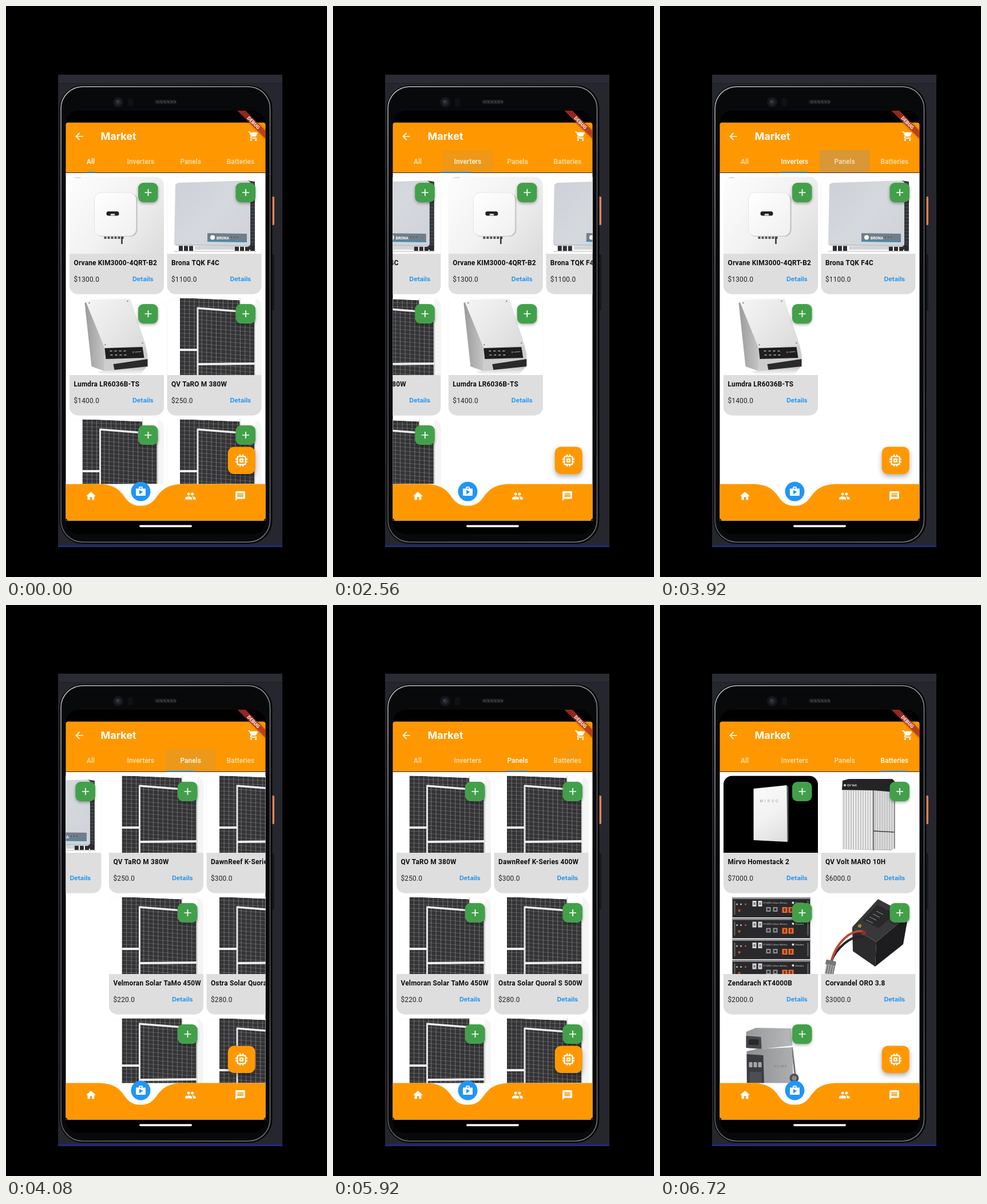
Recreate the animation shown at these times as an HTML page with a canvas. Size 561 by 998 pixels, loop 8.24 s.

```html
<!DOCTYPE html>
<html lang="en">
<head>
<meta charset="utf-8">
<title>Market</title>
<style>
  html, body { margin: 0; width: 100%; height: 100%; overflow: hidden; background: #000; }
  canvas { display: block; }
</style>
</head>
<body>
<canvas id="stage" width="561" height="998"></canvas>
<script>
const ctx = document.getElementById('stage').getContext('2d');
const LOOP = 8240, STEP = 80, SLIDE = 300;
const ORANGE = '#ff9800', BLUE = '#2196f3', GREEN = '#43a04a';
const LEFT = 104.5, RIGHT = 453.5, WIDTH = RIGHT - LEFT, TAB = WIDTH / 4;

const icons = {
  back: 'M20 11H7.83l5.59-5.59L12 4l-8 8 8 8 1.41-1.41L7.83 13H20v-2z',
  cart: 'M7 18c-1.1 0-2 .9-2 2s.9 2 2 2 2-.9 2-2-.9-2-2-2zM1 2v2h2l3.6 7.59-1.35 2.45c-.16.28-.25.61-.25.96 0 1.1.9 2 2 2h12v-2H7.42c-.14 0-.25-.11-.25-.25l.03-.12.9-1.63h7.45c.75 0 1.41-.41 1.75-1.03l3.58-6.49c.08-.14.12-.31.12-.48 0-.55-.45-1-1-1H5.21l-.94-2H1zm16 16c-1.1 0-2 .9-2 2s.9 2 2 2 2-.9 2-2-.9-2-2-2z',
  home: 'M10 20v-6h4v6h5v-8h3L12 3 2 12h3v8z',
  shop: 'M16 6V4c0-1.1-.9-2-2-2h-4c-1.1 0-2 .9-2 2v2H2v13c0 1.1.9 2 2 2h16c1.1 0 2-.9 2-2V6zM10 4h4v2h-4zM9 18V9l7.5 4z',
  people: 'M16 11c1.66 0 3-1.34 3-3s-1.34-3-3-3-3 1.34-3 3 1.34 3 3 3zm-8 0c1.66 0 3-1.34 3-3S9.66 5 8 5 5 6.34 5 8s1.34 3 3 3zm0 2c-2.33 0-7 1.17-7 3.5V19h14v-2.5c0-2.33-4.67-3.5-7-3.5zm8 0c-.29 0-.62.02-.97.05 1.16.84 1.97 1.97 1.97 3.45V19h6v-2.5c0-2.33-4.67-3.5-7-3.5z',
  chat: 'M20 2H4c-1.1 0-2 .9-2 2v18l4-4h14c1.1 0 2-.9 2-2V4c0-1.1-.9-2-2-2zm-2 12H6v-2h12zm0-3H6V9h12zm0-3H6V6h12z',
  chip: 'M15 9H9v6h6zm-2 4h-2v-2h2zm8-2V9h-2V7c0-1.1-.9-2-2-2h-2V3h-2v2h-2V3H9v2H7c-1.1 0-2 .9-2 2v2H3v2h2v2H3v2h2v2c0 1.1.9 2 2 2h2v2h2v-2h2v2h2v-2h2c1.1 0 2-.9 2-2v-2h2v-2h-2v-2zm-4 6H7V7h10z'
};

// ---------- drawing helpers ----------
function scoped(draw) { ctx.save(); draw(); ctx.restore(); }

function rect(x, y, w, h, fill) { ctx.fillStyle = fill; ctx.fillRect(x, y, w, h); }

function round(x, y, w, h, r, fill, stroke, width = 1) {
  ctx.beginPath();
  ctx.roundRect(x, y, w, h, r);
  if (fill) { ctx.fillStyle = fill; ctx.fill(); }
  if (stroke) { ctx.strokeStyle = stroke; ctx.lineWidth = width; ctx.stroke(); }
}

function circle(x, y, r, fill) {
  ctx.beginPath();
  ctx.arc(x, y, r, 0, 7);
  ctx.fillStyle = fill;
  ctx.fill();
}

function poly(fill, ...points) {
  ctx.beginPath();
  points.forEach(([x, y]) => ctx.lineTo(x, y));
  ctx.closePath();
  ctx.fillStyle = fill;
  ctx.fill();
}

function line(color, width, x1, y1, x2, y2) {
  ctx.strokeStyle = color;
  ctx.lineWidth = width;
  ctx.beginPath();
  ctx.moveTo(x1, y1);
  ctx.lineTo(x2, y2);
  ctx.stroke();
}

function text(str, x, y, font, fill, spacing = 0, align = 'left') {
  ctx.font = font;
  ctx.letterSpacing = spacing + 'px';
  ctx.textAlign = align;
  ctx.fillStyle = fill;
  ctx.fillText(str, x, y);
}

function blend(x1, y1, x2, y2, ...colors) {
  const g = ctx.createLinearGradient(x1, y1, x2, y2);
  colors.forEach((c, i) => g.addColorStop(i / (colors.length - 1), c));
  return g;
}

function icon(name, cx, cy, size = 20.3) {
  scoped(() => {
    ctx.translate(cx - size / 2, cy - size / 2);
    ctx.scale(size / 24, size / 24);
    ctx.fillStyle = '#fff';
    ctx.fill(new Path2D(icons[name]), 'evenodd');
  });
}

function shadow(blur, dy, alpha) {
  ctx.shadowColor = `rgba(0,0,0,${alpha})`;
  ctx.shadowBlur = blur;
  ctx.shadowOffsetY = dy;
}

// ---------- product pictures, each in a 164 x 134 box ----------
function roundInverter() {
  rect(-1, -1, 166, 135, blend(0, 0, 164, 134, '#fdfdfd', '#f2f2f2', '#dcdcdc'));
  rect(7, 0, 12, 2, '#ddd');
  for (let x = 60; x < 94; x += 6) rect(x, 103, 4, 5, '#555');
  line('#333', 2.5, 91, 104, 91, 117);
  round(44, 28, 74, 76, 12, '#bdbdbd');
  round(43, 27, 73, 76, 12, blend(43, 27, 116, 103, '#fff', '#f0f0f0'), '#dcdcdc', .7);
  round(64, 60, 22, 7.5, 3.5, '#222');
  round(71, 64, 8, 3.5, 2, '#ccc');
}

function wideInverter() {
  poly('#33363b', [140, 6], [153, 8], [153, 129], [140, 126]);
  for (let y = 10; y < 124; y += 6) rect(146, y, 7, 2, '#45494e');
  for (let x = 20; x < 46; x += 9) rect(x, 119, 7, 10, '#2f2f31');
  rect(48, 121, 70, 6, '#d2d4d8');
  for (let x = 118; x < 150; x += 9) rect(x, 119, 7, 10, '#2c2c2e');
  rect(12, 129, 142, 1.5, '#ccc');
  poly(blend(12, 8, 146, 122, '#cdd0d6', '#d5d8dd', '#cfd2d8'),
    [14, 13], [19, 10], [141, 6], [145, 9], [145, 118], [141, 122], [15, 120], [12, 116]);
  line('#b4b9c1', 1.2, 13, 118, 144, 120);
  poly('#717d8b', [70, 98], [139, 99], [139, 113], [70, 112]);
  line('#3c8fb6', 2, 70, 112, 139, 113);
  circle(79, 105.5, 4, '#fff');
  text('BRONA', 86, 109, 'bold 6.5px Roboto, sans-serif', '#fff');
  for (let x = 112; x < 124; x += 5) circle(x, 105, 1, '#444c56');
}

function tiltedInverter() {
  poly(blend(0, 122, 0, 134, '#ccc', '#fff'), [48, 128], [136, 118], [122, 134], [60, 134]);
  poly(blend(26, 0, 60, 0, '#9a9a9a', '#c4c4c4'), [26, 8], [36, 3], [62, 86], [60, 127], [38, 119]);
  poly('#cdcdcd', [61, 84], [132, 80], [136, 98], [136, 119], [60, 127]);
  poly(blend(36, 0, 130, 85, '#f4f4f4', '#e8e8e8', '#dadada'), [28, 6], [38, 2], [106, 1], [133, 83], [61, 87]);
  poly('#1d1e20', [61, 87], [127, 85], [130, 104], [63, 106]);
  poly('#2a2a2a', [76, 115], [136, 106], [136, 119], [78, 125]);
  for (let x = 70; x < 98; x += 8) {
    rect(x, 91, 4, 2, '#8d8d8d');
    rect(x + 1, 98, 4, 2, '#8d8d8d');
  }
  circle(111, 94, 1.6, '#d2443f');
  line('#aaa', 1, 114, 94, 125, 93);
  for (const [x, y] of [[34, 8], [101, 5], [62, 81], [127, 78]]) circle(x, y, 1.2, '#888');
}

function cells(x, y, w, h, slope) {
  scoped(() => {
    ctx.transform(1, slope, 0, 1, x, y);
    ctx.beginPath();
    ctx.rect(0, 0, w, h);
    ctx.clip();
    rect(0, 0, w, h, '#343436');
    for (let v = 6; v < h; v += 7) line('rgba(255,255,255,.24)', .8, 0, v, w, v);
    for (let u = 8.2; u < w; u += 8.4) line('rgba(255,255,255,.35)', .8, u, 0, u, h);
  });
}

function solarPanel(shift = 0) {
  rect(154, -1, 11, 135, '#f5f5f5');
  ctx.translate(0, shift);
  cells(22, -1, 105, 145, .04);
  line('#ddd', 2, 127, 0, 128, 20);
  rect(22, 88, 31, 4, '#eee');
  cells(52, 17, 102, 130, .08);
  line('#eee', 3.5, 52, 17, 154, 25);
  line('#e4e4e4', 3, 53, 16, 53, 145);
  line('#d9d9d9', 2, 153, 25, 153, 145);
  line('#eee', 4, 53, 115, 153, 114);
}

function wallBattery() {
  rect(-1, -1, 166, 135, '#000');
  poly('#55585a', [109, 16], [113, 18], [113, 113], [110, 115]);
  poly(blend(52, 20, 112, 116, '#fafafa', '#f2f2f2', '#dcdcdc'), [52, 22], [110, 16], [111, 115], [52, 112]);
  text('MIRVO', 63, 46, '6px Inter, sans-serif', '#9a9a9a', 3.2);
}

function stripedBattery() {
  poly('#bcbcbc', [36, 20], [128, 20], [128, 126], [122, 130], [36, 128]);
  for (let x = 36; x < 126; x += 4.2) rect(x, 25, 2.6, 103, x < 90 ? '#ececec' : '#dcdcdc');
  poly('#232426', [37, 8], [48, 5], [124, 5], [128, 9], [128, 28], [92, 25], [36, 24]);
  circle(41, 16, 2, '#ddd');
  text('QV Volt', 45, 18, 'bold 5px Roboto, sans-serif', '#ddd');
  line('#3c3c3c', 1.2, 91, 25, 91, 130);
  line('#3c3c3c', 1.5, 91, 96, 128, 98);
  line('#777', 1.5, 128, 10, 128, 127);
}

function rackBattery() {
  for (let i = 0; i < 4; i++) {
    const y = i * 36.5;
    rect(15, y, 136, 35, '#29292b');
    rect(15, y, 136, 3, '#8b8d90');
    rect(18, y + 6, 2, 24, '#66686a');
    rect(146, y + 6, 2, 24, '#66686a');
    for (const x of [23, 30, 38]) circle(x, y + 12, 1.5, x === 38 ? '#d9483b' : '#bbb');
    for (const x of [50, 60]) {
      rect(x, y + 6, 7, 10, '#d6d6d6');
      rect(x + 2, y + 9, 3, 4, '#77797b');
    }
    circle(27, y + 23, 2.2, '#c54b35');
    for (const x of [74, 86]) {
      rect(x, y + 17, 8, 8, '#909294');
      rect(x + 2, y + 19, 4, 4, '#333');
    }
    for (const x of [102, 113]) {
      rect(x, y + 17, 9, 10, '#ed6b32');
      rect(x + 3, y + 19, 3, 6, '#7a2c12');
    }
    text('KT4000 Lithium Battery', 69, y + 11, '4px Roboto, sans-serif', '#c9c9c9');
    circle(121, y + 9.5, 2, '#e8e8e8');
    text('Zendara', 125, y + 11, '4px Roboto, sans-serif', '#e8e8e8');
  }
}

function cable(color, dy) {
  ctx.beginPath();
  ctx.moveTo(74, 60 + dy);
  ctx.bezierCurveTo(52, 54 + dy, 25, 80 + dy, 17, 113);
  ctx.strokeStyle = color;
  ctx.lineWidth = 4;
  ctx.stroke();
}

function boxBattery() {
  poly('#2b2b2d', [54, 52], [96, 78], [94, 121], [55, 94]);
  poly('#1d1d1f', [96, 78], [152, 31], [143, 82], [94, 121]);
  poly('#38383b', [54, 52], [99, 3], [152, 31], [96, 78]);
  poly('#29292b', [72, 40], [98, 13], [128, 29], [100, 54]);
  for (let i = 0; i < 4; i++) line('#999', 1, 78 + i * 6, 39 - i * 5, 90 + i * 6, 45 - i * 5);
  circle(67, 50, 3, '#b2872f');
  cable('#242426', 10);
  cable('#bd4935', 0);
  circle(74, 62, 4, '#8d3025');
  scoped(() => {
    ctx.translate(15, 122);
    ctx.rotate(.2);
    round(-9, -12, 18, 9, 2, '#777');
    round(-7, -4, 15, 17, 2, '#aaa');
    for (let x = -5; x < 8; x += 4) rect(x, -3, 1.5, 15, '#666');
  });
}

function powerStation() {
  line('#777', 3, 119, 50, 125, 100);
  poly(blend(38, 0, 122, 0, '#97989a', '#b8b9bb'), [39, 23], [56, 16], [118, 17], [120, 47], [66, 53], [39, 51]);
  poly('#45474a', [39, 30], [65, 32], [66, 53], [39, 51]);
  poly(blend(38, 0, 122, 0, '#8b8d8f', '#aeafb1'), [40, 57], [58, 53], [119, 50], [123, 134], [40, 134]);
  poly('#3a3b3e', [40, 62], [69, 64], [71, 134], [41, 134]);
  round(43, 36, 18, 10, 2, '#292a2c');
  for (let x = 44; x < 66; x += 8) round(x, 76, 6, 9, 1, '#a5a6a8');
  round(45, 93, 21, 24, 2, '#4c4e51');
  text('VELMO', 88, 85, 'bold 5px Inter, sans-serif', '#86888a', 1);
  circle(123, 104, 8, '#505154');
  circle(123, 104, 4, '#8a8a8a');
}

// ---------- catalogue ----------
const inverters = [
  ['Orvane KIM3000-4QRT-B2', '1300.0', roundInverter],
  ['Brona TQK F4C', '1100.0', wideInverter],
  ['Lumdra LR6036B-TS', '1400.0', tiltedInverter]
];
const panels = [
  ['QV TaRO M 380W', '250.0', solarPanel],
  ['DawnReef K-Series 400W', '300.0', solarPanel],
  ['Velmoran Solar TaMo 450W', '220.0', solarPanel],
  ['Ostra Solar Quoral S 500W', '280.0', solarPanel],
  ['Hadril Solar 420W', '260.0', () => solarPanel(-8)],
  ['Tomvar Solar 430W', '270.0', solarPanel]
];
const batteries = [
  ['Mirvo Homestack 2', '7000.0', wallBattery],
  ['QV Volt MARO 10H', '6000.0', stripedBattery],
  ['Zendarach KT4000B', '2000.0', rackBattery],
  ['Corvandel ORO 3.8', '3000.0', boxBattery],
  ['Velmo Station', '4000.0', powerStation]
];
const tabs = [
  { label: 'All', from: 141, to: 155, items: [...inverters, ...panels.slice(0, 3)] },
  { label: 'Inverters', from: 211, to: 259, items: inverters },
  { label: 'Panels', from: 304, to: 340, items: panels },
  { label: 'Batteries', from: 385, to: 433, items: batteries }
];
// press: finger down, go: page starts sliding, x/y: touch point
const taps = [
  { tab: 1, press: 2320, go: 2427, x: 235, y: 271 },
  { tab: 2, press: 3570, go: 3930, x: 322, y: 271 },
  { tab: 3, press: 5810, go: 6170, x: 414, y: 263 }
];

// ---------- motion ----------
const clamp = v => Math.max(0, Math.min(1, v));
const mix = (a, b, p) => a + (b - a) * p;

// cubic-bezier(.25, .1, .25, 1)
function ease(p) {
  if (p <= 0 || p >= 1) return clamp(p);
  const curve = (s, a, b) => 3 * (1 - s) ** 2 * s * a + 3 * (1 - s) * s * s * b + s ** 3;
  let low = 0, high = 1;
  for (let i = 0; i < 20; i++) {
    const mid = (low + high) / 2;
    if (curve(mid, .25, .25) < p) low = mid; else high = mid;
  }
  return curve(low, .1, 1);
}

const pageAt = t => taps.reduce((sum, tap) => sum + ease((t - tap.go) / SLIDE), 0);

// ---------- parts of the scene ----------
function device() {
  rect(0, 0, 561, 998, '#000');
  rect(91, 120, 392, 826, '#26272e');
  rect(91, 120, 392, 15, '#2a2b33');
  rect(91, 135, 392, 1, '#1c1d23');
  rect(91, 943, 392, 2, '#1d2a9a');
  round(464, 333, 5, 50, 2, '#e08358');
  round(464, 434, 5, 98, 2, '#17181c');
  round(93.5, 138.5, 372, 801.5, 41, '#060708');
  round(96, 141, 365.5, 796, 38, '#0b0c0e', blend(96, 142, 462, 937, '#c0c2c4', '#66696c', '#55585b', '#77797c'), 1.5);
  round(99, 145, 360, 789, 34, '#08090a');
  round(LEFT, 183, WIDTH, 740, 22, '#000');
  circle(196, 168, 9, '#15171b');
  circle(196, 168, 5, '#24282f');
  circle(195, 167, 2, '#3d434c');
  round(213, 161, 9, 14, 3, '#0f1114');
  round(260, 164, 38, 7, 3.5, '#1d1f22');
  for (let x = 264; x < 297; x += 6) line('#4a4c50', 1.5, x, 166, x + 3, 169);
}

function card([name, price, picture], x, y) {
  scoped(() => {
    ctx.translate(x, y);
    scoped(() => {
      round(-.5, -.3, 165, 205, 15, '#dedede');
      ctx.clip();
      rect(-1, -1, 166, 135, '#fff');
      ctx.beginPath();
      ctx.rect(-1, -1, 166, 135);
      ctx.clip();
      picture();
    });
    scoped(() => {
      shadow(5, 2, .35);
      round(119.5, 10, 34.5, 34, 9, GREEN);
    });
    line('#fff', 1.7, 131, 27, 143, 27);
    line('#fff', 1.7, 137, 21, 137, 33);
    text(name, 7, 154, 'bold 11.85px Roboto, sans-serif', '#0c0c0c', .21);
    text('$' + price, 7, 182.5, '11.85px Roboto, sans-serif', '#222', .21);
    text('Details', 109.5, 182, 'bold 10.9px Inter, sans-serif', BLUE);
  });
}

function pages(page) {
  scoped(() => {
    ctx.beginPath();
    ctx.rect(LEFT, 291, WIDTH, 545);
    ctx.clip();
    tabs.forEach(({ items }, i) => {
      const offset = (i - page) * WIDTH;
      if (Math.abs(offset) >= WIDTH) return;
      items.forEach((item, n) =>
        card(item, 111.5 + offset + n % 2 * 170.5, 299 + Math.floor(n / 2) * 212));
    });
  });
}

function ripple(tap, t) {
  const grow = clamp((t - tap.press) / 320);
  const alpha = .36 * grow * (1 - clamp((t - tap.go) / SLIDE));
  if (!alpha) return;
  scoped(() => {
    ctx.beginPath();
    ctx.rect(LEFT + tap.tab * TAB, 252, TAB, 39);
    ctx.clip();
    circle(tap.x, tap.y, 10 + 90 * grow ** 3, `rgba(150,150,150,${alpha})`);
  });
}

function header(t, page) {
  round(LEFT, 203.7, WIDTH, 87.3, [4, 4, 0, 0], ORANGE);
  taps.forEach(tap => ripple(tap, t));
  rect(LEFT, 290.8, WIDTH, 1.2, '#4a4038');
  icon('back', 128, 228);
  icon('cart', 432.5, 227.5);
  text('Market', 165.5, 234, 'bold 18px Inter, sans-serif', '#fff');

  tabs.forEach(({ label }, i) => {
    const alpha = .7 + .3 * clamp(1 - Math.abs(page - i));
    text(label, LEFT + (i + .5) * TAB, 275.5, '500 11.85px Roboto, sans-serif', `rgba(255,255,255,${alpha})`, .08, 'center');
  });

  // The leading end of the underline runs ahead of the trailing end.
  const i = Math.min(2, Math.floor(page)), p = page - i, turn = p * Math.PI / 2;
  const from = mix(tabs[i].from, tabs[i + 1].from, (p + 1 - Math.cos(turn)) / 2);
  const to = mix(tabs[i].to, tabs[i + 1].to, (p + Math.sin(turn)) / 2);
  rect(from, 289.7, to - from, 1.8, BLUE);
}

function navigation() {
  scoped(() => {
    shadow(8, 4, .32);
    round(387.7, 770.5, 48, 47.5, 11, ORANGE);
  });
  icon('chip', 411.5, 794.3, 28);

  const at = share => LEFT + share * WIDTH;
  rect(LEFT, 835.5, WIDTH, 64, '#fff');
  ctx.beginPath();
  ctx.moveTo(LEFT, 835.5);
  ctx.lineTo(at(.175), 835.5);
  ctx.bezierCurveTo(at(.315), 838.7, at(.275), 873.6, at(.375), 873.6);
  ctx.bezierCurveTo(at(.475), 873.6, at(.435), 838.7, at(.575), 835.5);
  ctx.lineTo(RIGHT, 835.5);
  ctx.lineTo(RIGHT, 899.5);
  ctx.lineTo(LEFT, 899.5);
  ctx.fillStyle = ORANGE;
  ctx.fill();
  poly('#000', [LEFT, 895], [108, 899.5], [LEFT, 899.5]);
  poly('#000', [RIGHT, 895], [450, 899.5], [RIGHT, 899.5]);

  circle(235.5, 848.5, 17, BLUE);
  icon('shop', 235.5, 848.5);
  icon('home', 148.5, 856.5);
  icon('people', 322.5, 856.5);
  icon('chat', 409.5, 856.5);
  round(233, 907.3, 92, 3.6, 1.8, '#fff');
}

function debugRibbon() {
  scoped(() => {
    ctx.beginPath();
    ctx.roundRect(LEFT, 183, WIDTH, 740, 22);
    ctx.clip();
    ctx.translate(432.5, 204);
    ctx.rotate(Math.PI / 4);
    shadow(4, 0, .4);
    rect(-50, -5, 100, 10, 'rgba(186,52,38,.78)');
    ctx.shadowColor = 'transparent';
    text('DEBUG', 0, 3, '900 8.5px Roboto, sans-serif', '#f8ece8', 0, 'center');
  });
}

function render(t) {
  const page = pageAt(t);
  device();
  rect(LEFT, 291, WIDTH, 545, '#fff');
  pages(page);
  header(t, page);
  navigation();
  debugRibbon();
}

const start = performance.now();
function tick() {
  const t = Math.max(0, performance.now() - start) % LOOP;
  render(Math.floor(t / STEP) * STEP);
  requestAnimationFrame(tick);
}
tick();
</script>
</body>
</html>
```
